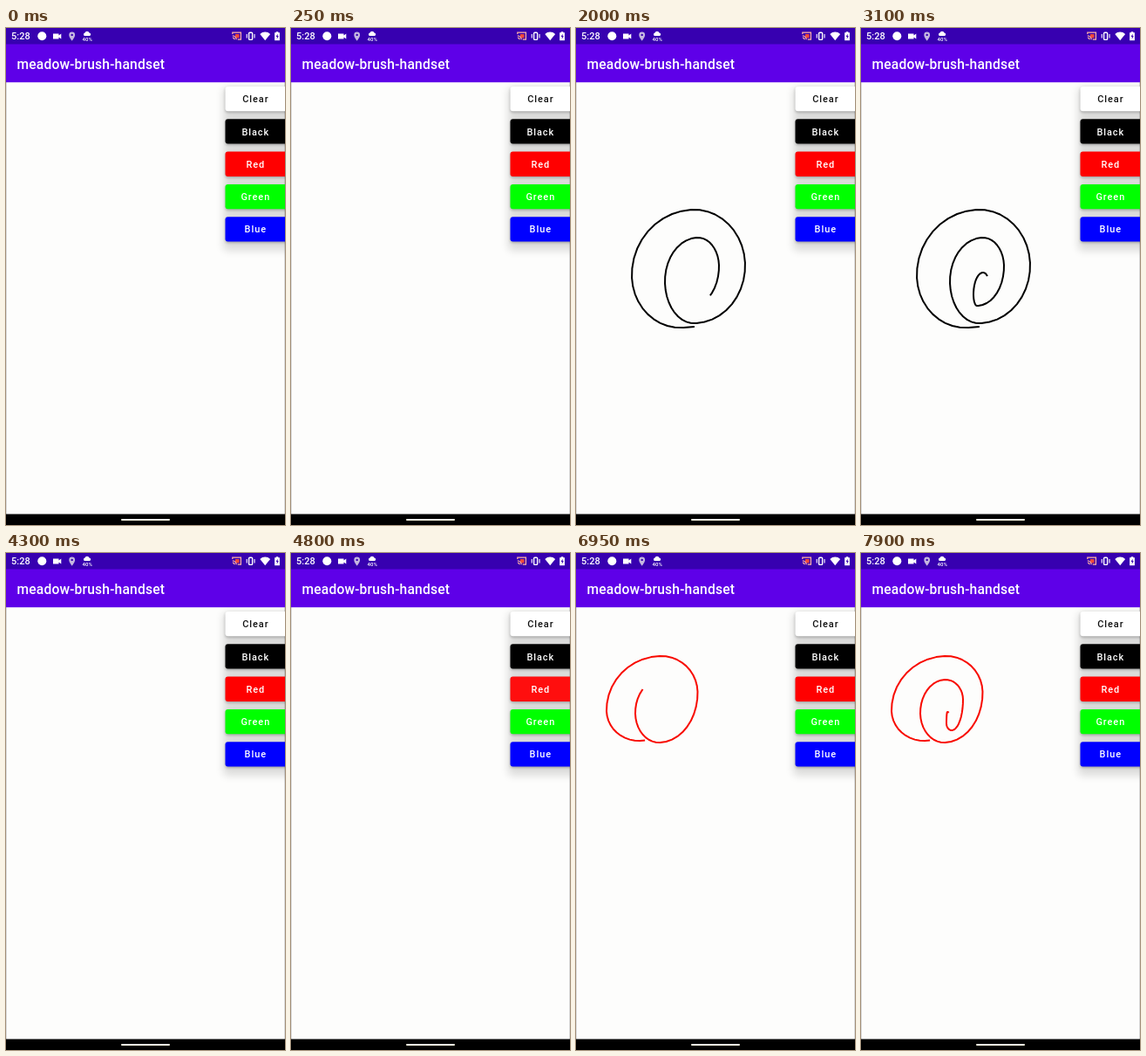
Recreate the animation shown at these times as an HTML page. Size 320 by 569 pixels, loop 8000 ms.

```html
<!DOCTYPE html>
<html lang="en">
<head>
<meta charset="utf-8">
<title>Drawing app</title>
<style>
  html, body { margin: 0; width: 100%; height: 100%; overflow: hidden; background: #fdfdfc; }
  svg { display: block; width: 320px; height: 569px; }
  text { font-family: Roboto, sans-serif; font-weight: 500; }
  .label { font-size: 10.9px; letter-spacing: .97px; text-anchor: middle; }
  .ink { fill: none; stroke-width: 2; stroke-linejoin: round; }
</style>
</head>
<body>
<svg viewBox="0 0 320 569">
  <defs>
    <filter id="soft" x="-40%" y="-20%" width="180%" height="140%"><feGaussianBlur stdDeviation="5"/></filter>
    <filter id="lift" x="-20%" y="-30%" width="140%" height="170%"><feGaussianBlur stdDeviation="1.5"/></filter>
    <clipPath id="page"><rect y="62" width="320" height="495"/></clipPath>
  </defs>

  <rect width="320" height="569" fill="#fdfdfc"/>
  <path d="M.5 62V557M319.5 62V557" stroke="#d8d8d8"/>
  <g id="drawing"></g>
  <g clip-path="url(#page)">
    <rect x="249" y="68" width="84" height="187" rx="5" opacity=".13" filter="url(#soft)"/>
    <g id="buttons"></g>
  </g>

  <rect width="320" height="19" fill="#3700b0"/>
  <rect y="18.5" width="320" height="43.7" fill="#5e00e8"/>
  <text x="12.4" y="46.6" font-size="15.6" letter-spacing=".2" fill="#fff">meadow-brush-handset</text>

  <g fill="#fff">
    <text x="6" y="13.4" font-size="11">5:28</text>
    <circle cx="41.3" cy="9.3" r="5"/>
    <path d="M54 6.5h6.5v2l2.8-2v6l-2.8-2v2H54z"/>
    <path d="M75.7 4.5a3.4 3.4 0 0 0-3.4 3.4c0 2.6 3.4 6.6 3.4 6.6s3.4-4 3.4-6.6a3.4 3.4 0 0 0-3.4-3.4z" fill="#c5b8e0"/>
    <circle cx="75.7" cy="7.9" r="1.2" fill="#3700b0"/>
    <path d="M90 9a1.8 1.8 0 0 1 .5-3.4 2.6 2.6 0 0 1 5-.1A1.8 1.8 0 0 1 96 9z"/>
    <text x="93.2" y="15.4" font-size="6" text-anchor="middle">40%</text>
    <rect x="263" y="7" width="4.5" height="4.4" fill="#f04838"/>
    <path d="M259.8 7V5.2h9.6v8h-3.6M259.8 8.8a4.5 4.5 0 0 1 4.4 4.4M259.8 11a2.2 2.2 0 0 1 2.2 2.2" fill="none" stroke="#ffb4a4" stroke-width="1.2"/>
    <rect x="278.6" y="5.2" width="4" height="8.2" rx="1" fill="none" stroke="#fff" stroke-width="1.4"/>
    <path d="M276.2 7v4.6M285 7v4.6" stroke="#fff" stroke-width="1.1"/>
    <path d="M291.3 7a8.5 8.5 0 0 1 11.8 0l-5.9 7.3z"/>
    <path d="M309.7 4.2h2.6v1h1.6v9h-5.8v-9h1.6z"/>
    <path d="M311.6 6.7l-2 3.3h1.2v2.5l2-3.3h-1.2z" fill="#3700b0"/>
  </g>

  <rect y="556.5" width="320" height="12.5"/>
  <rect x="132" y="562" width="56" height="2" rx="1" fill="#fffce4"/>
</svg>

<script>
const LOOP = 8000;
const PRESS = 400;

const BUTTONS = [
  { label: 'Clear', fill: '#fff', ink: '#111', press: 3900 },
  { label: 'Black', fill: '#000' },
  { label: 'Red', fill: '#f00', press: 4750 },
  { label: 'Green', fill: '#0f0' },
  { label: 'Blue', fill: '#00f' },
];

// Each spiral turns through its extremes: right, bottom, left, top, right, ...
// The pen runs from turn `from` to turn `to`, spending `pace` ms on each quarter.
const SPIRALS = [
  {
    color: '#000', start: 1020, pace: 128, from: .866, to: 11.6, clear: 3950,
    turns: [[200, 300], [119, 343], [64, 283], [136, 208], [194, 272], [135, 338],
      [102, 290], [140, 240], [164, 273], [133, 318], [129, 305], [140, 280], [146, 290]],
  },
  {
    color: '#f80a00', start: 6130, pace: 146, from: .88, to: 11.4, clear: LOOP,
    turns: [[110, 190], [72, 215], [35, 180], [98, 118], [139.5, 160], [95, 217],
      [68, 183], [97, 145], [117, 168], [104, 203], [98, 195], [99, 182], [102, 186]],
  },
];

const $ = id => document.getElementById(id);

function add(parent, tag, attrs, text) {
  const el = document.createElementNS('http://www.w3.org/2000/svg', tag);
  for (const key in attrs) el.setAttribute(key, attrs[key]);
  if (text) el.textContent = text;
  return parent.appendChild(el);
}

// Quarter ellipses; even turns leave vertically, odd ones horizontally
function pointAt(turns, u) {
  const k = Math.floor(u);
  const angle = (u - k) * Math.PI / 2;
  const lead = Math.sin(angle), lag = 1 - Math.cos(angle);
  const [ax, ay] = turns[k], [bx, by] = turns[k + 1];
  const [fx, fy] = k % 2 ? [lead, lag] : [lag, lead];
  return `${(ax + (bx - ax) * fx).toFixed(2)} ${(ay + (by - ay) * fy).toFixed(2)}`;
}

function trace({ turns, start, pace, from, to, clear }, t) {
  if (t <= start || t >= clear) return '';
  const end = Math.min(to, from + (t - start) / pace);
  const points = [];
  for (let u = from; u < end; u += .1) points.push(pointAt(turns, u));
  points.push(pointAt(turns, end));
  return 'M' + points.join('L');
}

for (const s of SPIRALS) {
  s.path = add($('drawing'), 'path', { class: 'ink', stroke: s.color });
}

BUTTONS.forEach((b, i) => {
  const y = 67 + i * 37.3;
  const box = { x: 251.5, y, width: 72, height: 28.3, rx: 3 };
  const ink = b.ink || '#fff';
  add($('buttons'), 'rect', { ...box, y: y + 1.5, opacity: .25, filter: 'url(#lift)' });
  add($('buttons'), 'rect', { ...box, fill: b.fill });
  b.flash = add($('buttons'), 'rect', { ...box, fill: ink, opacity: 0 });
  add($('buttons'), 'text', { class: 'label', x: 286.3, y: y + 18.2, fill: ink }, b.label);
});

function draw(now) {
  const t = now % LOOP;
  for (const s of SPIRALS) s.path.setAttribute('d', trace(s, t));
  for (const b of BUTTONS) {
    const p = (t - b.press) / PRESS;
    b.flash.setAttribute('opacity', p > 0 && p < 1 ? .14 * Math.sin(Math.PI * p) : 0);
  }
}

const began = performance.now();
function tick() {
  draw(performance.now() - began);
  requestAnimationFrame(tick);
}
tick();
</script>
</body>
</html>
```
